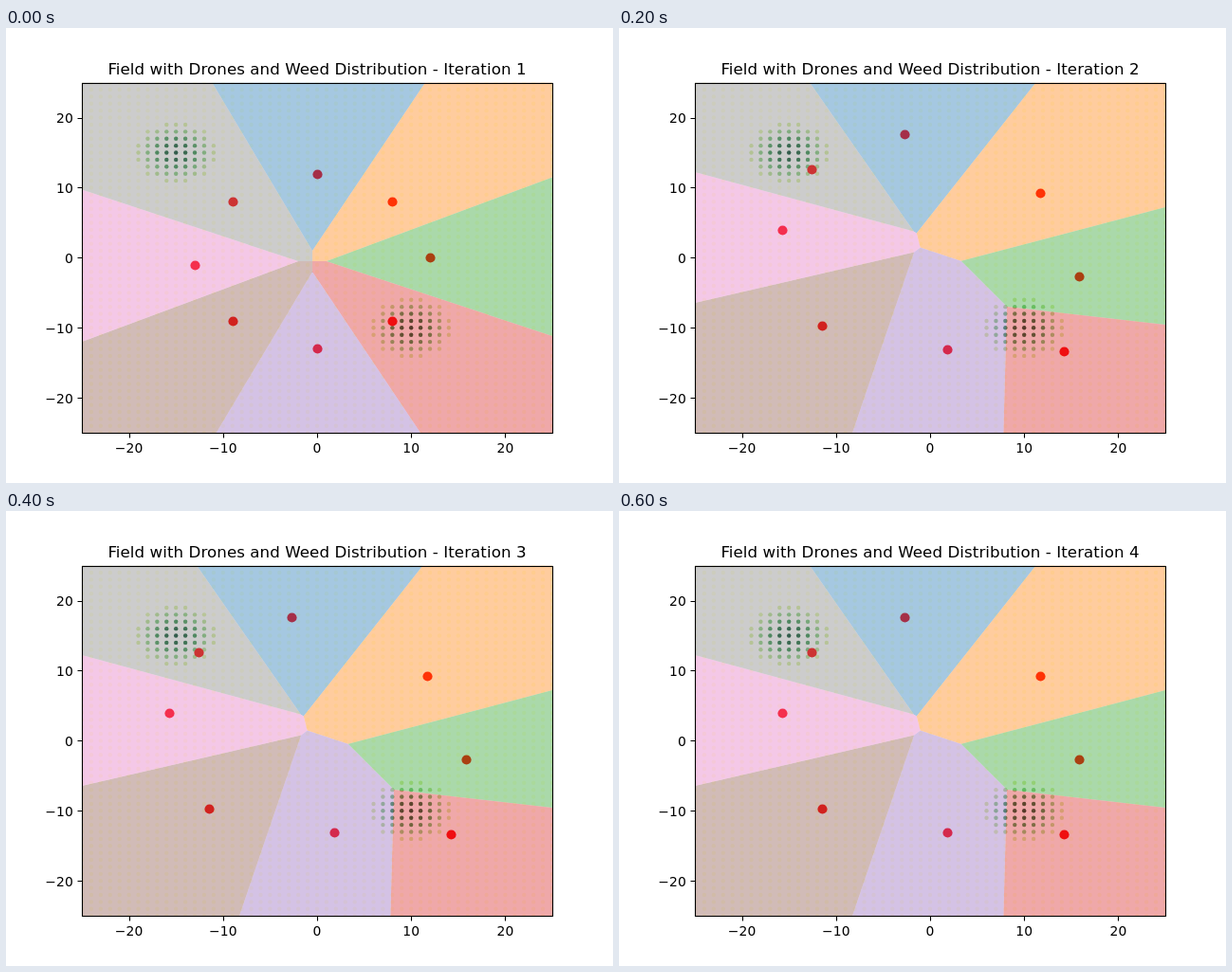
Recreate the animation shown at these times as an HTML page. Size 640 by 480 pixels, loop 800 ms.

```html
<!DOCTYPE html>
<html lang="en">
<head>
<meta charset="utf-8">
<title>Field with Drones</title>
<style>
html, body { margin: 0; width: 100%; height: 100%; overflow: hidden; background: #fff; }
svg { display: block; width: 640px; height: 480px; font: 13.89px "DejaVu Sans", sans-serif; letter-spacing: 0.16px; }
.title { font-size: 16.67px; letter-spacing: 0.07px; text-anchor: middle; }
.start, .rest, .title { animation: 800ms step-end infinite; }
.start { animation-name: first; }
.rest { animation-name: later; }
.title { animation-name: first; animation-delay: calc((var(--i) - 4) * 200ms); }
@keyframes first { 0% { visibility: visible; } 25%, 100% { visibility: hidden; } }
@keyframes later { 0% { visibility: hidden; } 25%, 100% { visibility: visible; } }
</style>
</head>
<body>
<svg viewBox="0 0 640 480">
  <defs><clipPath id="area"><rect x="80" y="57.6" width="496" height="369.6"/></clipPath></defs>
  <g id="field" clip-path="url(#area)"></g>
  <g id="axes"><rect x="80.5" y="58.5" width="496" height="369" fill="none" stroke="#000" stroke-width="1.1"/></g>
</svg>
<script>
const HALF = 25;
const px = x => 328 + 9.92 * x;
const py = y => 242.4 - 7.392 * y;
const snap = v => Math.round(v) + 0.5;
const field = document.getElementById('field');
const axes = document.getElementById('axes');

function add(parent, tag, attrs, text) {
  const el = document.createElementNS('http://www.w3.org/2000/svg', tag);
  for (const key in attrs) el.setAttribute(key, attrs[key]);
  if (text !== undefined) el.textContent = text;
  parent.appendChild(el);
  return el;
}

// Weed density: two bell-shaped patches, with the thin fringe cut off
const ramp = ['#ffffe5', '#d9f0a3', '#78c679', '#238443', '#004529'];
function shade(v) {
  const t = v * 4, i = Math.min(Math.floor(t), 3);
  return `color-mix(in srgb, ${ramp[i]}, ${ramp[i + 1]} ${(t - i) * 100}%)`;
}
const bell = (dx, dy) => Math.exp(-(dx * dx + dy * dy) / 12);

for (let x = -HALF; x <= HALF; x++) {
  for (let y = -HALF; y <= HALF; y++) {
    const density = Math.max(bell(x + 15, y - 15), bell(x - 10, y + 10));
    add(field, 'circle', {
      cx: px(x), cy: py(y), r: 2.2, style: 'fill:' + shade(density < 0.2 ? 0 : density)
    });
  }
}

// Keep the part of a polygon that is nearer to p than to q
function nearer(poly, p, q) {
  const side = ([x, y]) =>
    (x - (p[0] + q[0]) / 2) * (q[0] - p[0]) + (y - (p[1] + q[1]) / 2) * (q[1] - p[1]);
  const out = [];
  poly.forEach((a, i) => {
    const b = poly[(i + 1) % poly.length], da = side(a), db = side(b);
    if (da <= 0) out.push(a);
    if (da * db < 0) {
      const t = da / (da - db);
      out.push([a[0] + (b[0] - a[0]) * t, a[1] + (b[1] - a[1]) * t]);
    }
  });
  return out;
}

const colors = ['#1f77b4', '#ff7f0e', '#2ca02c', '#d62728', '#9467bd', '#8c564b', '#e377c2', '#7f7f7f'];
const square = [[-HALF, -HALF], [HALF, -HALF], [HALF, HALF], [-HALF, HALF]];

function drawScene(name, drones) {
  const g = add(field, 'g', { class: name });
  for (const [x, y] of drones) {
    add(g, 'circle', { cx: snap(px(x)), cy: snap(py(y)), r: 5.1, fill: '#f00' });
  }
  drones.forEach((p, i) => {
    const cell = drones.reduce((poly, q) => q === p ? poly : nearer(poly, p, q), square);
    add(g, 'polygon', {
      points: cell.map(([x, y]) => px(x) + ',' + py(y)).join(' '),
      fill: colors[i], 'fill-opacity': 0.4
    });
  });
}

// Drones start on a ring, clockwise from the top, rounded down to whole cells
const ring = colors.map((_, i) => {
  const a = (2 - i) * Math.PI / 4;
  return [Math.floor(12.1 * Math.cos(a)), Math.floor(12.1 * Math.sin(a))];
});
drawScene('start', ring);
drawScene('rest', [
  [-2.77, 17.7], [11.65, 9.2], [15.85, -2.7], [14.24, -13.37],
  [1.83, -13.12], [-11.45, -9.74], [-15.7, 3.95], [-12.56, 12.6]
]);

for (let v = -20; v <= 20; v += 10) {
  const label = String(v).replace('-', '\u2212');
  add(axes, 'path', {
    d: `M${snap(px(v))} 427.5v5M80.5 ${snap(py(v))}h-5`, stroke: '#000', 'stroke-width': 1.1
  });
  add(axes, 'text', { x: px(v), y: 448, 'text-anchor': 'middle' }, label);
  add(axes, 'text', { x: 71, y: Math.round(py(v) + 5.3), 'text-anchor': 'end' }, label);
}

for (let i = 0; i < 4; i++) {
  add(axes, 'text', { class: 'title', style: `--i:${i}`, x: 328, y: 49 },
    `Field with Drones and Weed Distribution - Iteration ${i + 1}`);
}
</script>
</body>
</html>
```
